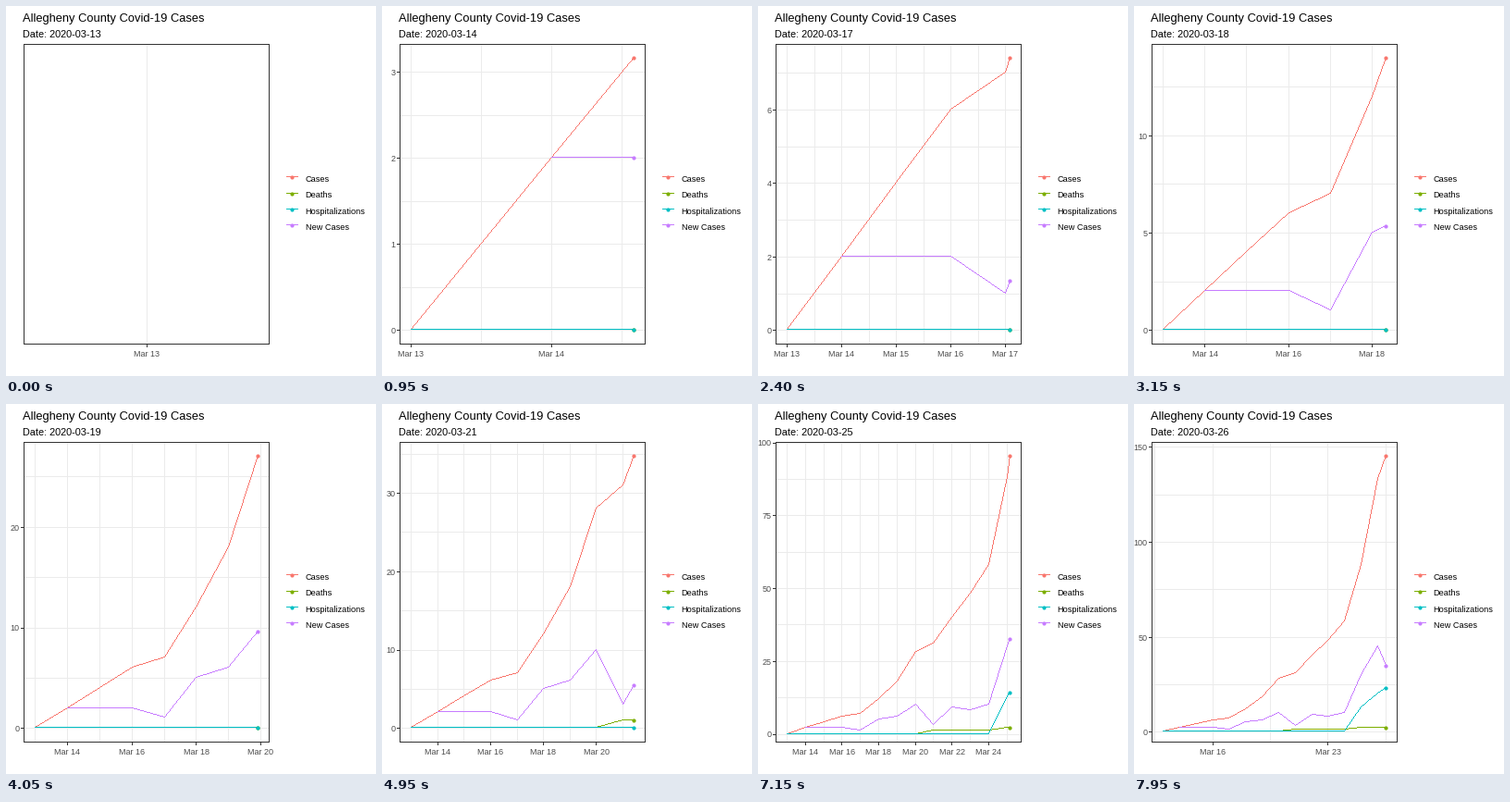
Animation of 400 by 400 pixels, one loop 8000 ms. Source, as a matplotlib script:

```python
import itertools
import math

import matplotlib.pyplot as plt
import numpy as np
from matplotlib.animation import FuncAnimation
from matplotlib.collections import LineCollection
from matplotlib.patches import Circle, Rectangle

SIZE, DPI = 400, 100
FRAMES, INTERVAL = 160, 50
FRAMES_PER_DAY = 11.77
PX = 72 / DPI
# panel edges as pixel columns and rows
LEFT, RIGHT, TOP, BOTTOM = 19, 284, 41, 365
GRID, DARK, AXIS_TEXT = "#EBEBEB", "#333333", "#4D4D4D"

# name: (colour, first day, daily values), days counted from March 13
SERIES = {
    "Cases": ("#F8766D", 0, [0, 2, 4, 6, 7, 12, 18, 28, 31, 40, 48, 58, 88, 133, 158]),
    "Deaths": ("#7CAE00", 0, [0] * 8 + [1] * 4 + [2] * 3),
    "Hospitalizations": ("#00BFC4", 0, [0] * 12 + [13, 20, 26]),
    "New Cases": ("#C77CFF", 1, [2, 2, 2, 1, 5, 6, 10, 3, 9, 8, 10, 30, 45, 25]),
}
DAYS = np.arange(15)
DAY_FRAMES = np.round(DAYS * FRAMES_PER_DAY)  # each day falls on a whole frame

plt.rcParams["font.family"] = "Liberation Sans"
fig = plt.figure(figsize=(SIZE / DPI, SIZE / DPI), dpi=DPI, facecolor="white")
ax = fig.add_axes([0, 0, 1, 1])
ax.set_xlim(0, SIZE)
ax.set_ylim(SIZE, 0)
ax.axis("off")
moving = []


def text(x, y, label, size, color="black", ha="left"):
    return ax.text(x, y, label, fontsize=size * PX, color=color, ha=ha, va="baseline")


def pixel_line(xs, ys, color):
    """Polyline of single pixels, without smoothing."""
    points = np.round(np.column_stack([xs, ys]))
    runs = [np.linspace(a, b, int(np.abs(b - a).max()) + 1)
            for a, b in zip(points, points[1:])]
    pixels = np.round(np.concatenate(runs or [points]))
    return ax.plot(*pixels.T, ",", color=color, zorder=3)[0]


def dot(x, y, color):
    center = round(x) + 0.5, round(y) + 0.5
    return ax.add_patch(Circle(center, 2.1, fc=color, lw=0, zorder=4))


def segments(lines, color, z):
    return ax.add_collection(
        LineCollection(lines, colors=color, linewidths=PX, antialiaseds=False, zorder=z))


def expand(low, high):
    pad = 0.05 * (high - low)
    return low - pad, high + pad


def day_breaks(low, high):
    """Daily, two-daily or weekly (Monday) ticks, as the range grows."""
    step, origin = (1, 0) if high <= 5 else (2, 1) if high <= 13 else (7, 3)
    first = origin + step * math.ceil((low - origin) / step)
    return list(range(first, math.floor(high) + 1, step))


def value_breaks(low, high, wanted=5):
    """Extended Wilkinson labelling of the range."""
    nice = [1, 5, 2, 2.5, 4, 3]
    span = high - low
    best_score, best = -math.inf, []
    for j, (i, q), k in itertools.product((1, 2), enumerate(nice), range(2, 10)):
        z0 = math.ceil(math.log10(span / (k + 1) / j / q))
        for z in range(z0, z0 + 2):
            step = j * q * 10.0 ** z
            first = math.floor(high / step) * j - (k - 1) * j
            for start in range(first, math.ceil(low / step) * j + 1):
                lo = start * step / j
                hi = lo + step * (k - 1)
                has_zero = start % j == 0 and lo <= 0 <= hi
                simple = 1 - i / (len(nice) - 1) - j + has_zero
                cover = 1 - 0.5 * ((high - hi) ** 2 + (low - lo) ** 2) / (0.1 * span) ** 2
                ratio = (k - 1) / (hi - lo) * (max(hi, high) - min(lo, low)) / (wanted - 1)
                density = 2 - max(ratio, 1 / ratio)
                score = 0.25 * simple + 0.2 * cover + 0.5 * density
                if score > best_score + 1e-9:
                    best_score, best = score, [lo + step * n for n in range(k)]
    return [b for b in best if low <= b <= high]


def minor_breaks(breaks, low, high):
    if len(breaks) < 2:
        return []
    step = breaks[1] - breaks[0]
    middles = [breaks[0] - step / 2] + [b + step / 2 for b in breaks]
    return [m for m in middles if low <= m <= high]


def value_labels(breaks):
    digits = next((d for d in range(3)
                   if all(abs(b - round(b, d)) < 1e-9 for b in breaks)), 3)
    return [f"{abs(b) if abs(b) < 1e-9 else b:.{digits}f}" for b in breaks]


def draw_x_axis(now, to_x):
    low, high = expand(0, now)
    breaks = day_breaks(low, high)
    lines = [[(to_x(d), TOP), (to_x(d), BOTTOM)]
             for d in breaks + minor_breaks(breaks, low, high)]
    ticks = [[(to_x(d), BOTTOM), (to_x(d), BOTTOM + 3)] for d in breaks]
    moving.extend([segments(lines, GRID, 1), segments(ticks, DARK, 5)])
    moving.extend(text(to_x(d) + 0.3, 378.6, f"Mar {13 + d}", 9, AXIS_TEXT, "center")
                  for d in breaks)


def draw_y_axis(low, high, to_y):
    breaks = value_breaks(low, high)
    lines = [[(LEFT, to_y(v)), (RIGHT, to_y(v))]
             for v in breaks + minor_breaks(breaks, low, high)]
    ticks = [[(LEFT - 3, to_y(v)), (LEFT, to_y(v))] for v in breaks]
    moving.extend([segments(lines, GRID, 1), segments(ticks, DARK, 5)])
    moving.extend(text(14.5, to_y(v) + 3.8, label, 9, AXIS_TEXT, "right")
                  for v, label in zip(breaks, value_labels(breaks)))


def draw_series(now, to_x, to_y):
    for color, first, values in SERIES.values():
        known = np.arange(first, first + len(values))
        days = np.append(known[known < now], now)
        ys = to_y(np.interp(days, known, values))
        moving.append(pixel_line(to_x(days), ys, color))
        moving.append(dot(to_x(now), ys[-1], color))


def update(frame):
    for artist in moving:
        artist.remove()
    moving.clear()
    now = np.interp(frame, DAY_FRAMES, DAYS)
    subtitle.set_text(f"Date: 2020-03-{13 + int(frame / FRAMES_PER_DAY)}")

    x_low, x_high = expand(0, now)

    def to_x(day):
        if now == 0:
            return (LEFT + RIGHT) / 2
        return LEFT + (day - x_low) / (x_high - x_low) * (RIGHT - LEFT)

    draw_x_axis(now, to_x)
    if now < 1:
        return

    # the view follows the values at the current time
    current = [np.interp(now, range(first, first + len(values)), values)
               for _, first, values in SERIES.values()]
    y_low, y_high = expand(min(current), max(current))

    def to_y(value):
        return BOTTOM - (value - y_low) / (y_high - y_low) * (BOTTOM - TOP)

    draw_y_axis(y_low, y_high, to_y)
    draw_series(now, to_x, to_y)


text(18.4, 17, "Allegheny County Covid-19 Cases", 12.9)
subtitle = text(18.4, 34, "", 10.9)
ax.add_patch(Rectangle((LEFT, TOP), RIGHT - LEFT, BOTTOM - TOP, fill=False,
                       ec=DARK, lw=PX, aa=False, zorder=5))
for row, (name, (color, _, _)) in enumerate(SERIES.items()):
    y = 185.4 + 17.28 * row
    pixel_line([303, 315], [y, y], color)
    dot(309, y, color)
    text(323.6, y + 4.6, name, 9.2)

anim = FuncAnimation(fig, update, frames=FRAMES, interval=INTERVAL,
                     init_func=lambda: update(0), repeat=True, repeat_delay=0)
plt.show()
```
